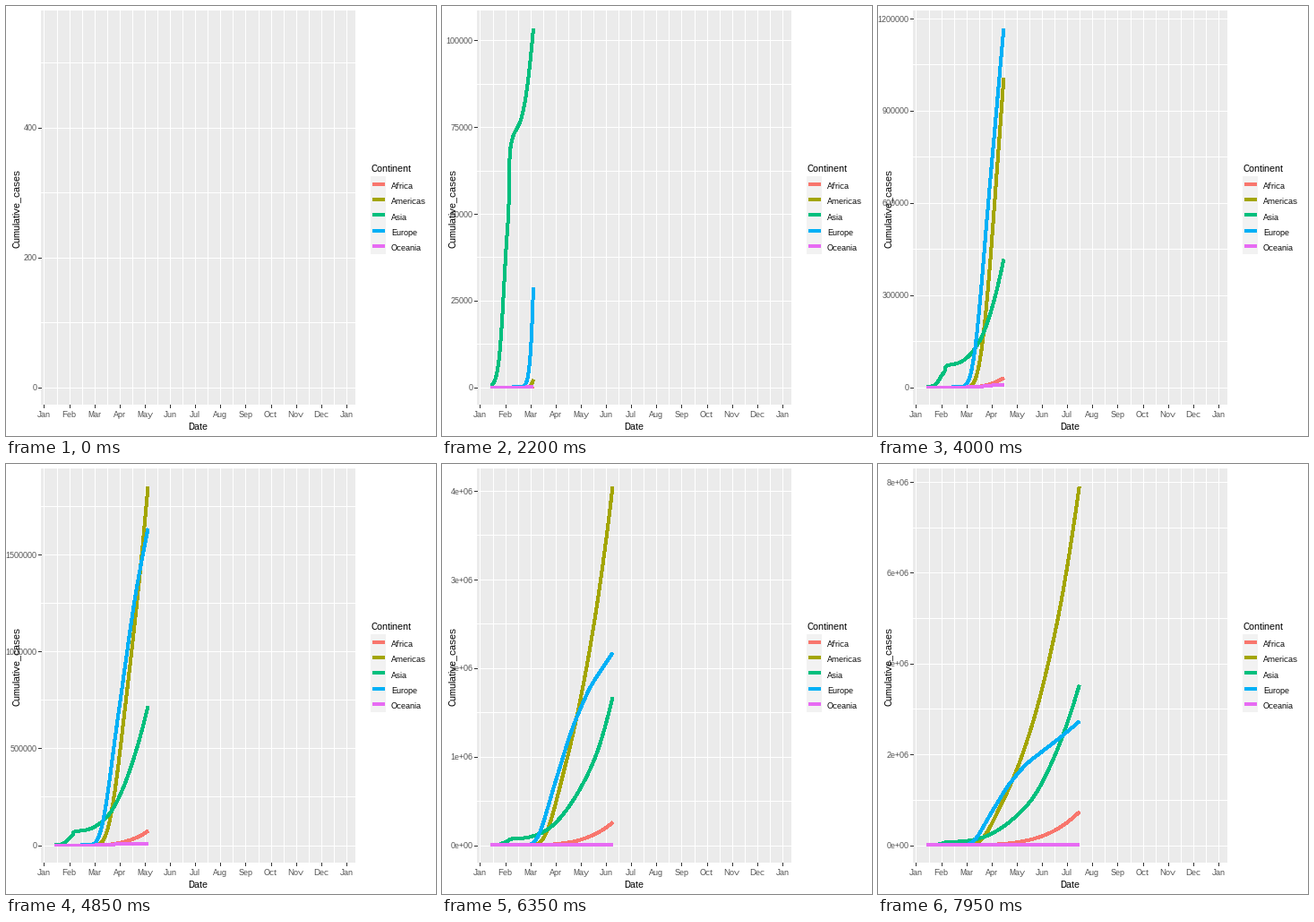
A matplotlib script for the animation above (8000 ms loop, 480x480 px).

```python
import numpy as np
import matplotlib.pyplot as plt
from matplotlib.animation import FuncAnimation
from matplotlib.patches import Rectangle

SIZE, DPI = 480, 96
PX = 72 / DPI                       # points per pixel
FRAMES, INTERVAL = 160, 50
LEFT, RIGHT, TOP, BOTTOM = 39, 390, 5, 445
X0, SPAN = LEFT + 351 / 22, 351 / 1.1
Y0, RISE = BOTTOM - 19.5, 400
DAYS, STEPS = 344, 299              # whole year of data, steps to reveal it

plt.rcParams.update({"font.family": "Liberation Sans",
                     "text.hinting": "native", "text.hinting_factor": 1})
GREY, DARK = "#4D4D4D", "#333333"
COLORS = {"Africa": "#F8766D", "Americas": "#A3A500", "Asia": "#00BF7D",
          "Europe": "#00B0F6", "Oceania": "#E76BF3"}


def wave(day, size, middle, width):
    return size / (1 + np.exp((middle - day) / width))


def spread(day, *bends):
    """Square of a rounded polyline; each bend is (day, added slope)."""
    root = sum(k * 4 * np.log1p(np.exp((day - t) / 4)) for t, k in bends)
    return root ** 2


# Cumulative cases, in thousands
day_axis = np.arange(185)
CASES = {
    "Africa": spread(day_axis, (52, .135), (104, .065), (138, .07), (162, .05)),
    "Americas": spread(day_axis, (53.5, .92), (81.5, -.347), (130, .05),
                       (162, .11)),
    "Asia": (wave(day_axis, 59.4, 15.5, 3.32) + wave(day_axis, 15, 21.5, .25)
             + spread(day_axis, (30, .26), (66, .09), (128, .14), (165, .04))),
    "Europe": spread(day_axis, (46.5, 1), (69.7, -.49), (94, -.23),
                     (118, -.128)),
    "Oceania": spread(day_axis, (57, .2), (69, -.19)),
}


def nice_step(top):
    """Step and count of axis breaks from zero: simple, covering, about five."""
    low, high = -.05 * top, 1.05 * top
    best = (-9, 1, 2)
    for i, q in enumerate([1, 5, 2, 2.5, 4, 3]):
        for z in range(int(np.log10(top)) - 2, int(np.log10(top)) + 2):
            for k in range(2, 13):
                step = q * 10.0 ** z
                end = step * (k - 1)
                miss = (high - end) ** 2 + low ** 2
                cover = 1 - .5 * miss / (.1 * (high - low)) ** 2
                ratio = (max(end, high) - low) / 4 / step
                dense = 2 - max(ratio, 1 / ratio)
                score = .25 * (1 - i / 5) + .2 * cover + .5 * dense
                best = max(best, (score, step, k))
    return best[1:]


def labels(vals):
    """Plain numbers unless the exponent form is shorter."""
    plain = [f"{v:.0f}" for v in vals]
    for digits in range(3):
        sci = [f"{v:.{digits}e}" for v in vals]
        if all(abs(float(s) - v) < 1e-6 * max(vals) for s, v in zip(sci, vals)):
            break
    return plain if len(plain[-1]) <= len(sci[-1]) else sci


fig = plt.figure(figsize=(SIZE / DPI, SIZE / DPI), dpi=DPI, facecolor="white")
ax = fig.add_axes([0, 0, 1, 1])
ax.set(xlim=(0, SIZE), ylim=(SIZE, 0))
ax.axis("off")


def box(x, y, w, h, color):
    patch = Rectangle((x, y), w, h, fc=color, ec="none", lw=0, zorder=0)
    return ax.add_patch(patch)


def line(xs, ys, color, width, z):
    return ax.plot(xs, ys, color=color, lw=width * PX, zorder=z,
                   antialiased=False, solid_capstyle="butt",
                   solid_joinstyle="round")[0]


def text(x, y, s, size, color="black", **kw):
    return ax.text(x, y, s, fontsize=size * PX, color=color, va="baseline",
                   zorder=6, **kw)


panel = box(LEFT, TOP, RIGHT - LEFT, BOTTOM - TOP, "#EBEBEB")
MONTHS = "Jan Feb Mar Apr May Jun Jul Aug Sep Oct Nov Dec Jan".split()
GAP = 28.12
for i, month in enumerate(MONTHS):
    x = 42.49 + GAP * i
    line([x, x], [TOP, BOTTOM], "white", 1, 1)
    if i < 12:
        line([x + GAP / 2] * 2, [TOP, BOTTOM], "white", 1, 1)
    line([x, x], [BOTTOM, BOTTOM + 3], DARK, 1, 2)
    text(x, 459, month, 9, GREY, ha="center")
text(214, 473, "Date", 11, ha="center")
ax.text(15, 225.5, "Cumulative_cases", fontsize=11 * PX, rotation=90,
        rotation_mode="anchor", ha="center", va="baseline", zorder=7)

KEY, KEY_TOP = 17.28, 190.2
text(407, 185, "Continent", 11)
box(407, KEY_TOP, KEY, 5 * KEY, "#F2F2F2")
for i, (name, color) in enumerate(COLORS.items()):
    y = KEY_TOP + KEY * (i + .5)
    line([408.7, 422.5], [y, y], color, 4, 3)
    text(430, y + 5.2, name, 9)

curves = {name: line([], [], c, 3, 4) for name, c in COLORS.items()}
for curve in curves.values():
    curve.set_clip_path(panel)
axis_parts = []


def draw(frame):
    while axis_parts:
        axis_parts.pop().remove()

    day = frame * DAYS / STEPS
    days = np.append(np.arange(int(day) + 1), day)
    seen = {n: 1000 * np.interp(days, day_axis, v) for n, v in CASES.items()}
    top = max(v.max() for v in seen.values())
    scale = RISE / top

    step, count = nice_step(top)
    vals = [step * k for k in range(count)]
    shown = [v for v in vals if v <= top * 1.05]
    for v, label in zip(shown, labels(shown)):
        y = Y0 - v * scale
        axis_parts.append(line([LEFT, RIGHT], [y, y], "white", 1, 1))
        axis_parts.append(line([LEFT - 3, LEFT], [y, y], DARK, 1, 2))
        axis_parts.append(text(34.5, y + 3.7, label, 9, GREY, ha="right"))
    for v in vals:
        y = Y0 - (v + step / 2) * scale
        if y > TOP:
            axis_parts.append(line([LEFT, RIGHT], [y, y], "white", 1, 1))

    xs = X0 + days * SPAN / DAYS
    for name, curve in curves.items():
        curve.set_data(xs, Y0 - seen[name] * scale)
        curve.set_visible(frame > 0)


anim = FuncAnimation(fig, draw, frames=FRAMES, interval=INTERVAL,
                     repeat=True, repeat_delay=0)
plt.show()
```
